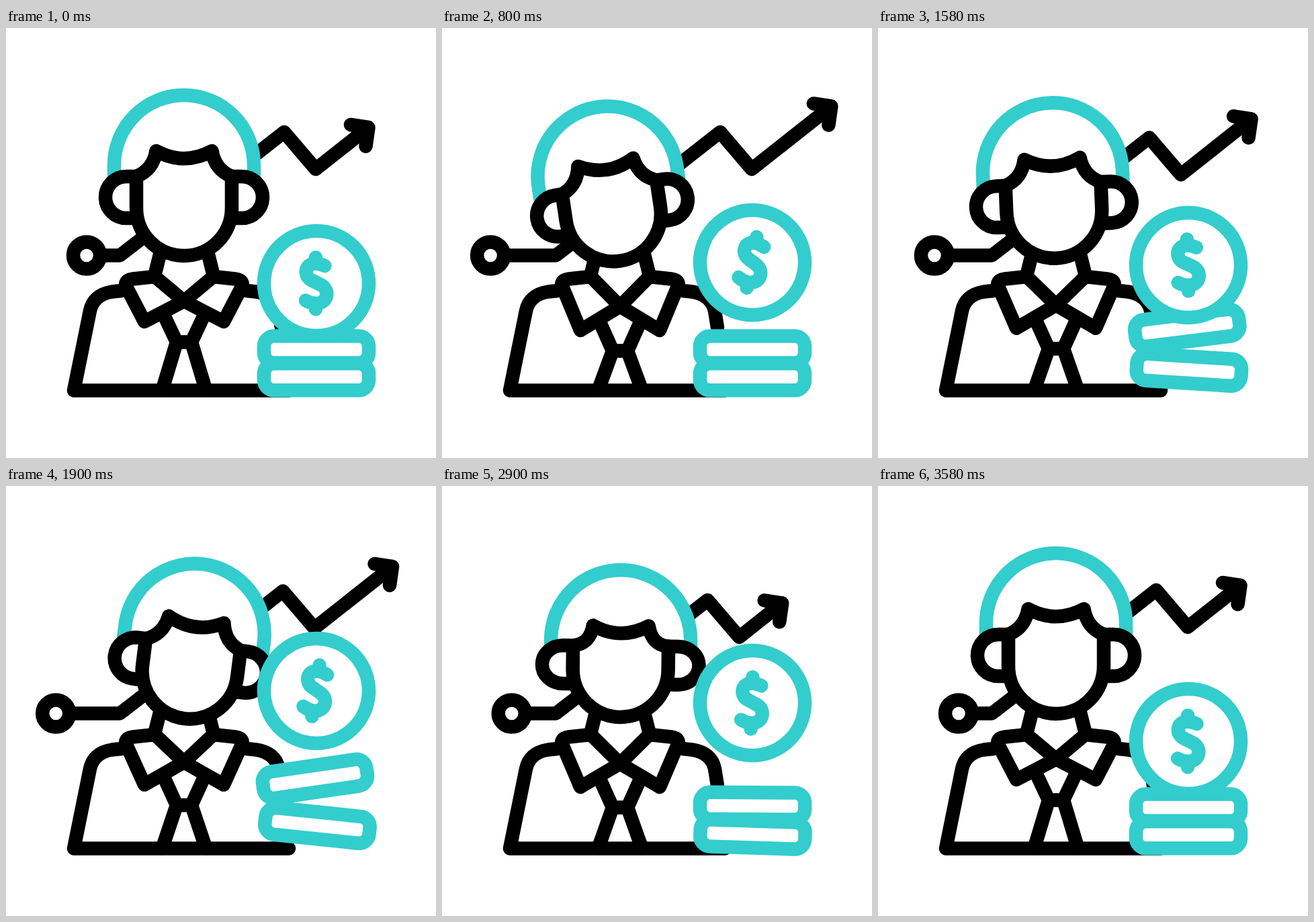
Write an HTML page that moves like this. It is 640 by 640 pixels and loops after 3600 ms.

```html
<!DOCTYPE html>
<html lang="en">
<head>
<meta charset="utf-8">
<title>Investment adviser</title>
<style>
  html, body { margin: 0; width: 100%; height: 100%; overflow: hidden; background: #fff; }
  svg { display: block; width: 100vw; height: 100vh; }
  .ink, .cyan { fill: none; stroke: #000; stroke-width: 20.5; stroke-linecap: round; stroke-linejoin: round; }
  .cyan { stroke: #33cdcd; }
  .solid { fill: #fff; }
  .flat { stroke-linecap: butt; }
</style>
</head>
<body>
<svg viewBox="0 0 640 640">
  <path id="chart" class="ink"/>
  <path id="wire" class="ink"/>
  <circle id="mic" class="ink solid" cy="338.5" r="20"/>

  <path class="ink" d="M172 391 L158 392.5 Q130 397 125 421 L101 539.5 H421"/>
  <path class="ink" d="M358 391 L372 392.5 Q401 397 406 421 L410 446"/>
  <g id="half">
    <path class="ink" d="M229.5 335 L221 369"/>
    <path id="tie" class="ink"/>
    <path id="collar" class="ink solid"/>
  </g>
  <use href="#half" transform="translate(530 0) scale(-1 1)"/>

  <g id="head">
    <path id="hair" class="cyan solid flat"/>
    <path id="ears" class="ink solid"/>
    <path id="face" class="ink solid"/>
  </g>

  <rect id="chipLow" class="cyan solid" x="-78" y="-20" width="156" height="40" rx="15"/>
  <rect id="chipTop" class="cyan solid" x="-78" y="-20" width="156" height="40" rx="15"/>
  <g id="coin">
    <circle class="cyan solid" r="78"/>
    <path class="cyan" d="M12.5 -26 Q5 -29.5 -1 -29.5 C-19 -29.5 -19 -9 -6 -4 L6 2 C21 9 17 30 0 30 Q-9 30 -16 25.5 M-1 -38.5 V-30 M-1 30 V38.5"/>
  </g>
</svg>
<script>
const LOOP = 3600;
// Beats shared by the moving parts.
const GO = 220, UP = 820, DIP = 1430, HIGH = 2060, LOW = 2560, NOD = 2900, REST = 3440;

const $ = id => document.getElementById(id);
const draw = (id, d) => $(id).setAttribute('d', d);
const place = (id, x, y, turn) => $(id).setAttribute('transform', `translate(${x} ${y}) rotate(${turn})`);

function render(t) {
  // Eased 0 to 1 from a to b; bump goes up to 1 at b and back by c.
  const ramp = (a, b) => {
    const p = Math.min(1, Math.max(0, (t - a) / (b - a)));
    return p * p * (3 - 2 * p);
  };
  const bump = (a, b, c) => ramp(a, b) - ramp(b, c);
  const sag = bump(UP, DIP, HIGH);
  const on = ramp(GO, UP) - ramp(NOD, REST);
  const bow = bump(2500, NOD, REST);

  drawChart(
    40 * ramp(GO, UP) - 28 * sag - 90 * ramp(HIGH, LOW) + 50 * ramp(LOW, REST),
    12 * sag + 28 * bump(HIGH, LOW, REST));
  drawMic(48 * (ramp(GO, UP) - ramp(HIGH, REST)) - 14 * sag);
  drawCollar(13 * ramp(GO, UP) - 8 * ramp(UP, LOW) + 6 * ramp(LOW, NOD) - 11 * ramp(NOD, REST));
  drawHead(
    -8.5 * ramp(GO, UP) + 17.5 * ramp(1260, HIGH) - 9 * ramp(2460, 2980),
    3 * on + 5.5 * (bump(GO, UP, DIP) + bump(DIP, HIGH, LOW)) + 2 * bow,
    7.5 * on + 12.5 * bow,
    7 * on + 2.5 * bow);

  const rise = bump(UP, 1950, 3060);
  const lowTurn = 8 * bump(UP, 2450, 3100);
  const topTurn = 3.5 * bump(2200, 2460, 3000) - 8.5 * bump(UP, 1850, 2400);
  place('chipLow', 462 + lowTurn / 4, 519.3 - 14 * rise, lowTurn);
  place('chipTop', 462 + topTurn / 4, 478.6 - 43 * rise, topTurn);

  const lift = 31 * ramp(GO, UP) - 14 * sag + 55 * ramp(DIP, HIGH)
    - 38 * ramp(HIGH, LOW) + 9 * ramp(LOW, NOD) - 57 * ramp(3380, 3580);
  const fade = Math.max(0, Math.cos(Math.PI * (t - 800) / 4800));
  const rock = 11 * ramp(GO, 800) * fade * Math.cos(Math.PI * (t - 800) / 540);
  place('coin', 462 + 54 * bump(NOD, 3430, 3580), 380 - lift, rock);
}

function drawChart(tip, slide) {
  const x = 539.5 + tip, y = 148 - 0.79 * tip;
  const at = (px, py) => `${px - slide} ${py + 0.8 * slide}`;
  draw('chart', `M${at(340, 213)} L${at(414, 155)} L${at(461, 210)} L${x} ${y}
    M${x - 26.5} ${y - 4} L${x} ${y} l-4 28`);
}

function drawMic(out) {
  $('mic').setAttribute('cx', 120 - out);
  draw('wire', `M${140 - out} 338.5 H169.5 L222 298`);
}

// Left half only; the right half mirrors it.
function drawCollar(drop) {
  const knot = 467.5 + drop;
  draw('tie', `M233 ${423 + 0.8 * drop} L254 ${knot} H265 M254 ${knot} L232.5 539`);
  draw('collar', `M221.5 370 L189 373.5 Q174 375.5 180 387 L206 ${437 + drop} L265 ${406.5 + 0.6 * drop} Z`);
}

// The head turns about the jaw; hair and ears lag behind it.
function drawHead(turn, chin, hair, ear) {
  $('head').setAttribute('transform',
    `translate(${265 + 1.2 * turn} ${268 + chin}) rotate(${turn}) translate(-265 -268)`);
  const squash = (hair - ear) / 4, tuck = Math.abs(turn) * 0.45;
  const top = 221 + ear + squash, bottom = 283 + ear - squash, ry = (bottom - top) / 2;
  draw('hair', `M161 ${top + 4} V${204 + hair} a104 104 0 0 1 208 0 V${top + 4}`);
  draw('ears', `M194 ${top} H${179 + tuck} a31 ${ry} 0 0 0 0 ${2 * ry} H194
    M336 ${top} H${351 - tuck} a31 ${ry} 0 0 1 0 ${2 * ry} H336`);
  draw('face', `M194 ${top} V268 a71 71 0 0 0 142 0 V${top}
    Q311 ${211 + hair} 306.5 ${183 + hair} Q265 ${205.5 + hair} 223.5 ${183 + hair} Q219 ${211 + hair} 194 ${top} Z`);
}

const start = performance.now();
function tick() {
  render((performance.now() - start) % LOOP);
  requestAnimationFrame(tick);
}
tick();
</script>
</body>
</html>
```
